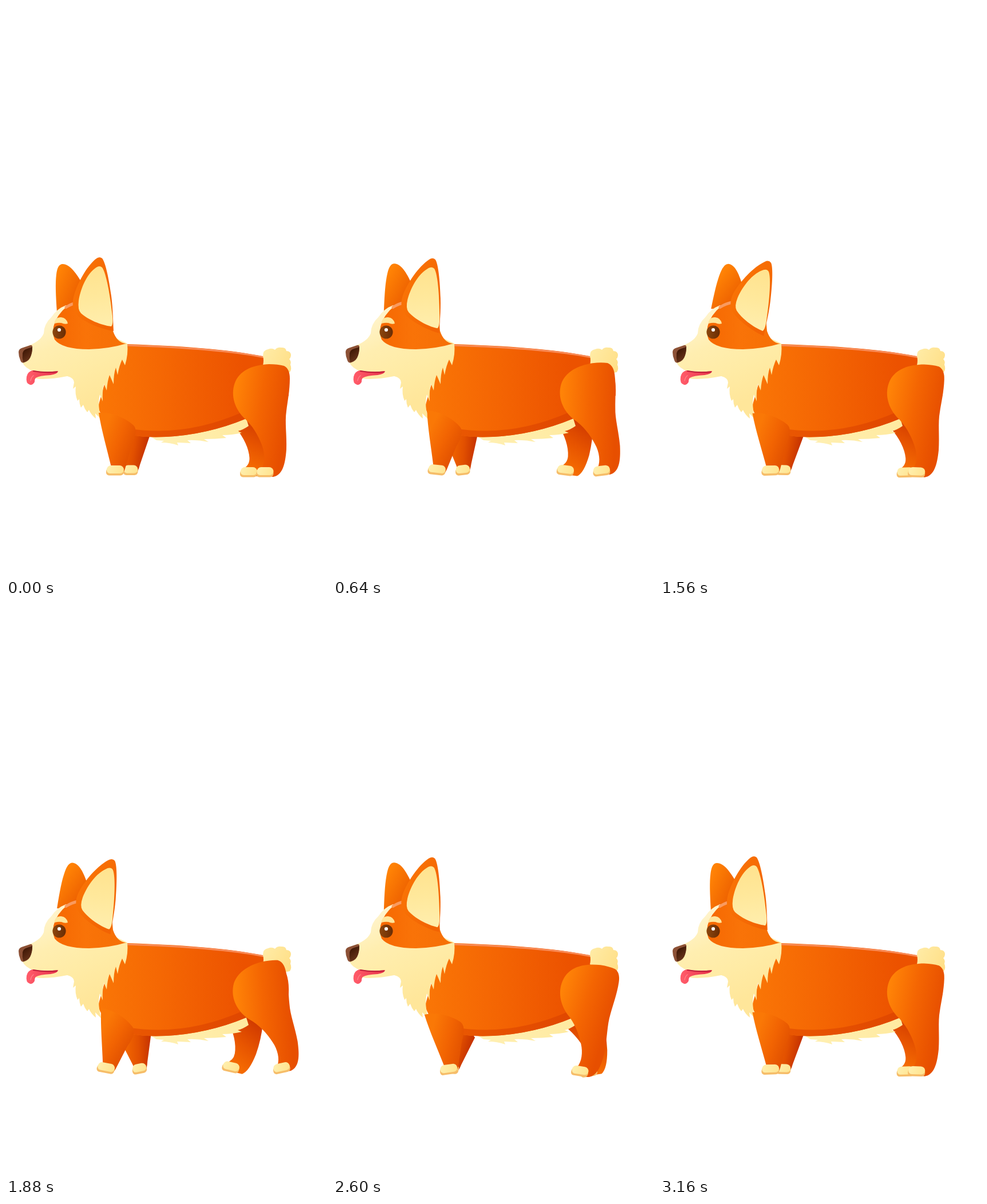
Recreate the animation shown at these times as an HTML page with a canvas. Size 561x998 px, loop 3.2 s.

```html
<!DOCTYPE html>
<html lang="en">
<head>
<meta charset="utf-8">
<title>Walking corgi</title>
<style>
html, body { margin: 0; width: 100%; height: 100%; overflow: hidden; background: #fff; }
canvas { display: block; width: 100vw; height: 100vh; }
</style>
</head>
<body>
<canvas id="stage" width="561" height="998"></canvas>
<script>
const ctx = document.getElementById('stage').getContext('2d');
const LOOP = 3200, STEP = 1600, TICK = 40;

function grad(x1, y1, x2, y2, ...stops) {
  const g = ctx.createLinearGradient(x1, y1, x2, y2);
  stops.forEach((c, i) => g.addColorStop(i / (stops.length - 1), c));
  return g;
}

const fill = (d, paint) => {
  ctx.fillStyle = paint;
  ctx.fill(new Path2D(d));
};

const line = (d, paint, width) => {
  ctx.strokeStyle = paint;
  ctx.lineWidth = width;
  ctx.lineCap = 'round';
  ctx.stroke(new Path2D(d));
};

function disc(x, y, r, paint) {
  ctx.fillStyle = paint;
  ctx.beginPath();
  ctx.arc(x, y, r, 0, Math.PI * 2);
  ctx.fill();
}

function box(x, y, w, h, radii, paint) {
  ctx.fillStyle = paint;
  ctx.beginPath();
  ctx.roundRect(x, y, w, h, radii);
  ctx.fill();
}

// Draw a part turned by deg (clockwise) about its joint.
function turned(x, y, deg, draw) {
  ctx.save();
  ctx.translate(x, y);
  ctx.rotate(deg * Math.PI / 180);
  ctx.translate(-x, -y);
  draw();
  ctx.restore();
}

function paw(x, y, w) {
  box(x, y + 3, w, 14.5, [8, 7, 6, 5], '#f6bd69');
  box(x + 1, y, w - 1, 14, [8, 8, 7, 6], grad(x, y, x + w, y + 12, '#fff0b0', '#ffe38e'));
}

function farEar() {
  fill('M89 535 C87 505 86 485 88 469 Q90 451 99 451 C112 451 123 468 133 484 L128 525 Z',
    grad(86, 480, 132, 500, '#ff8205', '#ec5e00'));
}

function nearEar() {
  fill('M157 442 Q163 437 168 441 C174 448 180 478 184 507 C187 530 187 550 188 568 ' +
    'C172 566 143 556 127 543 Q113 530 118 509 C124 486 140 456 157 442 Z',
    grad(118, 500, 188, 520, '#f97305', '#f26303'));
  fill('M155 459 Q163 452 168 457 C175 466 182 505 185.5 538 Q188 556 184 560 ' +
    'C166 558 143 548 131 537 Q125 531 127 515 C131 491 142 469 155 459 Z',
    grad(148, 460, 160, 555, '#ffe38f', '#ffe89b', '#ffedab'));
}

function farFrontLeg() {
  fill('M198 738 L198 768 L208 803 L210 818 L225 819 Q231 815 234 802 L251 752 L235 735 Z',
    grad(202, 770, 246, 778, '#f16500', '#e25000', '#c43100'));
  paw(205, 802.5, 25.5);
}

function nearFrontLeg() {
  fill('M162 711 C180 709 205 717 222 732 Q232 741 220 767 L208 809 Q205 820 197 819 ' +
    'L184 806 C176 772 167 742 162 711 Z',
    grad(168, 750, 225, 772, '#fa7806', '#f26402', '#e15000'));
  paw(175, 803, 31);
}

function farHindLeg() {
  fill('M400 735 Q424 765 425.5 790 Q426 803 414 809 L430 822 L446 822 Q457 815 462 783 Q465 755 462 730 L440 690 Z',
    grad(455, 735, 420, 805, '#d23c00', '#e75400', '#f56b02'));
  paw(409, 806, 30);
}

function nearHindLeg() {
  fill('M460 626 C434 627 411 635 401 656 C392 677 398 701 415 719 C431 733 441 751 447 767 ' +
    'C453 782 453 798 447 808 L453 821 L467 823 C483 820 488 802 490 775 C491 750 487 728 490 708 ' +
    'C492 691 496 672 496 651 Q496 634 486 629 Q475 626 460 626 Z',
    grad(398, 690, 492, 705, '#ff8307', '#f46502', '#e74f00'));
  paw(437.5, 806, 30);
}

function belly() {
  fill('M245 748 L263 759 L276 760 L271 763 Q287 763 301 768 L299 763 L323 764 L317 759 ' +
    'Q335 758 354 762 L346 757 Q365 757 385 755 L378 750 Q395 750 412 746 L405 743 Q414 741 424 734 L418 715 Z',
    grad(250, 750, 420, 740, '#fff0b4', '#ffeaa0'));
}

function tail() {
  fill('M449 628 Q451 619 449 612 Q449 601 458 600 Q465 597 470 601 Q474 596 481 597 ' +
    'Q489 596 490 603 Q498 603 498 611 Q497 616 495 617 Q499 621 497 627 Q500 634 496 640 L470 645 Z',
    grad(450, 605, 498, 630, '#ffeba5', '#ffdf87'));
}

function body() {
  fill('M200 589 L212 591 C300 594 385 599 452 613 L480 627 Q496 645 494 681 L470 700 L420 721 ' +
    'Q353 749 280 753 Q235 755 215 748 Q169 735 161 700 L175 650 Z',
    grad(162, 670, 415, 670, '#fa7606', '#f46503', '#ec5200'));
  fill('M212 738 Q312 755 415 709 L420 721 Q353 749 280 753 Q235 755 215 748 Z',
    grad(205, 740, 415, 720, '#ea5802', '#e04700'));
  line('M211 593 C300 596 385 601 449 613.5', '#f98b57', 3.2);
}

function head() {
  // muzzle, neck and chest fur
  fill('M105 523 Q89 529 80 543 Q66 556 66 572 Q60 588 30 597 L28 622 Q34 634 48 638 L51 651 ' +
    'Q72 654 107 647 Q119 650 119 658 L117 669 L122 665 Q120 678 125 690 L128 687 Q128 695 131 702 ' +
    'L135 697 Q137 704 142 710 L145 706 Q149 715 157 721 L156 712 L166 722 L163 706 ' +
    'Q161 692 164 679 L169 691 Q168 674 171 660 L176 672 Q177 656 181 645 L188 661 Q188 643 192 632 ' +
    'L195 645 Q198 628 203 618 L208 628 Q214 608 212 590 L150 560 Z',
    grad(80, 535, 150, 690, '#fff4cd', '#ffeeb0', '#ffeba5', '#ffe69a'));
  // orange mask
  fill('M130 513 L117 518 Q96 530 86 551 Q79 569 85 583 Q98 600 145 600 Q181 599 210 590 ' +
    'Q194 589 187 568 L184 535 L150 505 Z',
    grad(84, 570, 195, 570, '#f66802', '#f97308', '#f67006'));
  line('M105 526.5 Q114 520.5 126 518', '#f99a5f', 5);
  // brow and eye
  fill('M85 555 Q85 544 96 544 Q106 545 108 555 Q103 557 97 554 Q91 553 85 555 Z', '#ffe59a');
  disc(93, 570, 11.6, grad(82, 570, 105, 570, '#8b460d', '#6a2c04'));
  disc(93, 566, 3.1, '#fff');
  // nose
  fill('M22 605 Q22 600 27 598 L42 593 Q47 592 46 598 Q46 607 42 615 Q39 621 32 623 Q27 625 25 619 Q22 612 22 605 Z',
    '#8c5136');
  fill('M29 607 Q30 601 37 599 L46 596 Q46 607 42 615 Q38 621 30 623 Q28 615 29 607 Z',
    grad(29, 602, 43, 619, '#3d1604', '#69351c'));
  // mouth and tongue
  fill('M46 637 Q67 641 91 638 Q91 643 78 645 Q58 646 52 650 Q50 652 50 657 Q47 663 42 662 ' +
    'Q34 660 36 648 Q38 639 46 637 Z', grad(38, 645, 85, 642, '#ff5b69', '#e8364c'));
  line('M48 638 Q67 641.5 89 639.5', '#bd1f3b', 2);
  line('M48 646 Q44 649 43 655', '#ff8088', 1.5);
}

// Triangle wave: 0 at the start, 1 at a quarter, -1 at three quarters.
const swing = p => 1 - 4 * Math.abs(((p + 0.25) % 1) - 0.5);

function draw(t) {
  const stride = swing(t / STEP);
  const tilt = 1 - Math.abs(2 * t / LOOP - 1);
  ctx.fillStyle = '#fff';
  ctx.fillRect(0, 0, 561, 998);
  turned(110, 533, 15.8 * tilt, farEar);
  turned(440, 672, 18.2 * stride, farHindLeg);
  turned(221, 733, -16 * stride, farFrontLeg);
  belly();
  body();
  tail();
  head();
  turned(151, 546, 15 * tilt, nearEar);
  turned(196, 729, 16 * stride, nearFrontLeg);
  turned(442, 678, -17.6 * stride, nearHindLeg);
}

const start = performance.now();
function frame() {
  const t = (performance.now() - start) % LOOP;
  draw(Math.floor(t / TICK) * TICK);
  requestAnimationFrame(frame);
}
frame();
</script>
</body>
</html>
```
